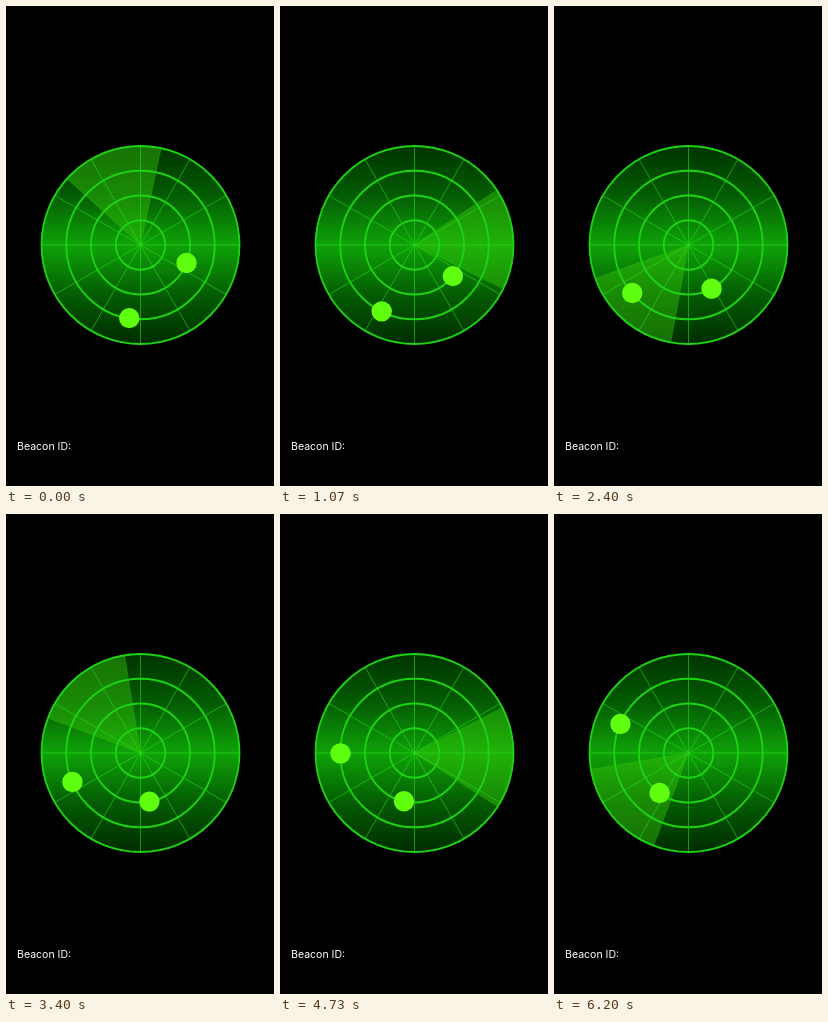
Animation of 268 by 480 pixels, one loop 6270 ms. Source, as an HTML page:

```html
<!DOCTYPE html>
<html lang="en">
<head>
<meta charset="utf-8">
<title>Radar</title>
<style>
  html, body { margin: 0; width: 100%; height: 100%; overflow: hidden; background: #000; }
  svg { display: block; width: 100%; height: 100%; }
  text { font: 400 10.55px Inter, "Open Sans", sans-serif; fill: #fff; }
</style>
</head>
<body>
<svg viewBox="0 0 268 480">
  <defs>
    <linearGradient id="glow" x1="0" y1="0" x2="0" y2="1">
      <stop offset="0" stop-color="#003400"/>
      <stop offset=".25" stop-color="#045c03"/>
      <stop offset=".5" stop-color="#0fa308"/>
      <stop offset=".75" stop-color="#045c03"/>
      <stop offset="1" stop-color="#002c00"/>
    </linearGradient>
  </defs>
  <g transform="translate(134.5 239)">
    <circle r="99" fill="url(#glow)"/>
    <path id="sweep" fill="#37c80a" fill-opacity=".42" stroke="#37c80a" stroke-opacity=".3" stroke-width="1"/>
    <g id="spokes" stroke="#28dc1e" stroke-opacity=".58" stroke-width="1"/>
    <g id="rings" fill="none" stroke="#1ed214" stroke-width="1.8"/>
    <g id="blips" fill="#60ff10"/>
  </g>
  <text x="11" y="443.8">Beacon ID:</text>
</svg>
<script>
const LOOP = 6270, RADIUS = 99, SPAN = 60;

// step number, sweep centre, blip drift (degrees clockwise from the top)
const keys = [
  [0, -18, 0],
  [16, 86.3, 17.6],
  [36, 220.3, 40.8],
  [51, 320.7, 58.2],
  [71, 452.8, 80.9],
  [84, 536, 95.2],
  [90, 575, 101.7],
  [93, 590.6, 104.4]
];
const blips = [{ r: 74, start: 188.7 }, { r: 49.4, start: 111.4 }];

const $ = id => document.getElementById(id);

function add(parent, tag, attrs) {
  const el = document.createElementNS("http://www.w3.org/2000/svg", tag);
  for (const name in attrs) el.setAttribute(name, attrs[name]);
  return parent.appendChild(el);
}

function polar(r, deg) {
  const a = deg * Math.PI / 180;
  return [r * Math.sin(a), -r * Math.cos(a)];
}

for (let i = 1; i <= 4; i++) add($("rings"), "circle", { r: RADIUS * i / 4 });
for (let deg = 0; deg < 360; deg += 30) {
  const [x2, y2] = polar(RADIUS, deg);
  add($("spokes"), "line", { x1: 0, y1: 0, x2, y2 });
}
for (const blip of blips) blip.el = add($("blips"), "circle", { r: 10.2 });

const [x1, y1] = polar(RADIUS, -SPAN / 2);
const [x2, y2] = polar(RADIUS, SPAN / 2);
$("sweep").setAttribute("d", `M0 0L${x1} ${y1}A${RADIUS} ${RADIUS} 0 0 1 ${x2} ${y2}Z`);

// Fifteen steps a second, on a 70/60/70 ms rhythm
function stepAt(t) {
  const rest = t % 200;
  return 3 * Math.floor(t / 200) + (rest >= 130 ? 2 : rest >= 70 ? 1 : 0);
}

function sample(step, col) {
  let i = 1;
  while (i < keys.length - 1 && step > keys[i][0]) i++;
  const a = keys[i - 1], b = keys[i];
  const k = Math.min(1, (step - a[0]) / (b[0] - a[0]));
  return a[col] + (b[col] - a[col]) * k;
}

function draw(t) {
  const step = stepAt(t);
  const drift = sample(step, 2);
  $("sweep").setAttribute("transform", `rotate(${sample(step, 1)})`);
  for (const { r, start, el } of blips) {
    const [x, y] = polar(r, start + drift);
    el.setAttribute("cx", x);
    el.setAttribute("cy", y);
  }
}

const begin = performance.now();
function tick() {
  draw((performance.now() - begin) % LOOP);
  requestAnimationFrame(tick);
}
tick();
</script>
</body>
</html>
```
